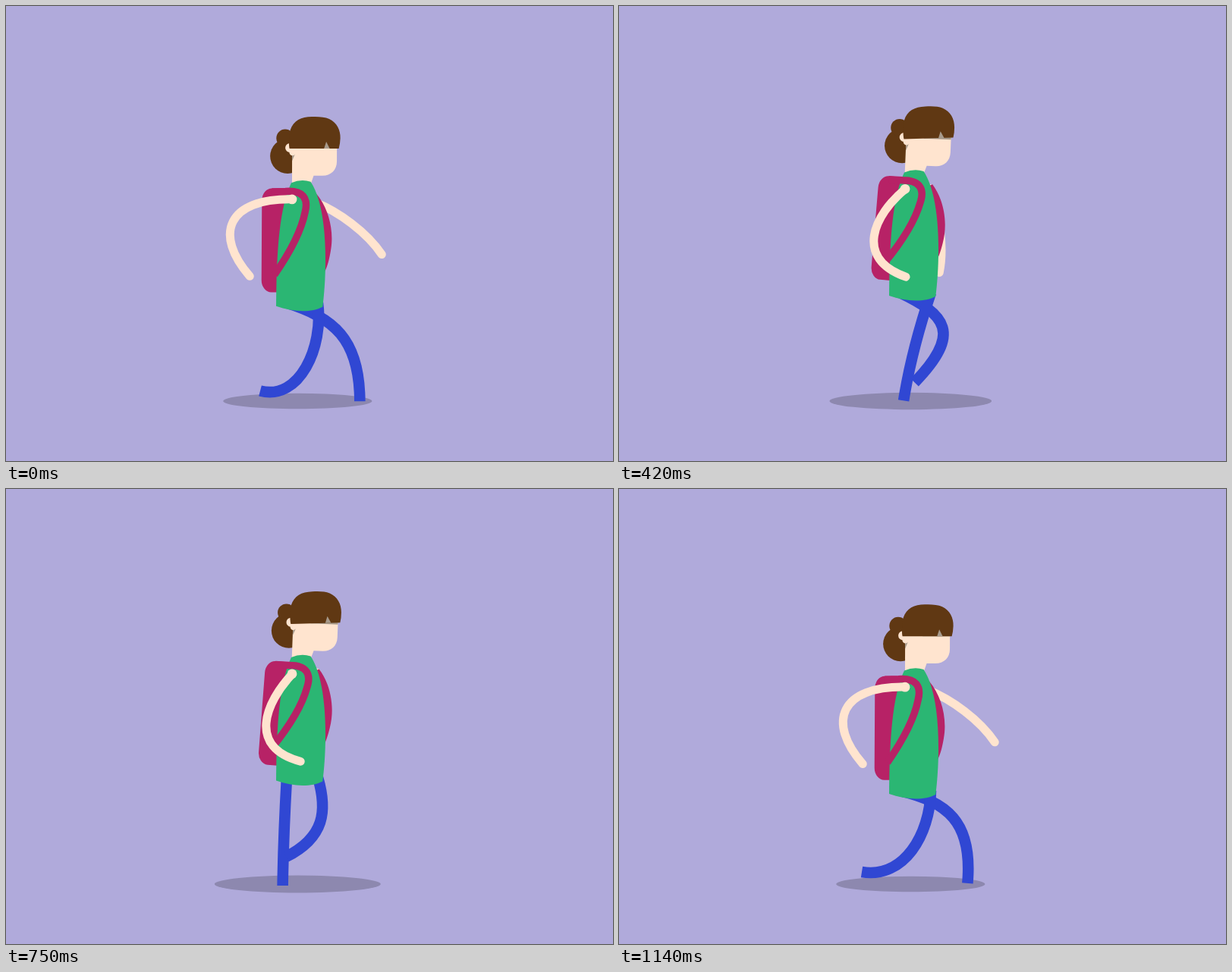
Recreate the animation shown at these times as an HTML page. Size 800x600 px, loop 1.17 s.

```html
<!DOCTYPE html>
<html lang="en">
<head>
<meta charset="utf-8">
<title>Walking with a backpack</title>
<style>
  html, body { margin: 0; height: 100%; overflow: hidden; background: #b0aadb; }
  svg { display: block; width: 100vw; height: 100vh; }
  .limb { fill: none; }
  .leg { stroke: #3047d3; stroke-width: 14.6; }
  .arm { stroke: #ffe4cf; stroke-width: 11; stroke-linecap: round; }
  .skin { fill: #ffe4cf; }
  .hair { fill: #603813; }
  .shade { fill: #a79a8b; }
  .bag { fill: #b72266; }
  .strap { fill: none; stroke: #b72266; stroke-width: 9.5; }
  .shirt { fill: #2bb673; }
</style>
</head>
<body>
<svg viewBox="0 0 800 600">
  <ellipse id="shadow" cx="384.3" cy="521" fill="#000" fill-opacity=".2"/>
  <path id="legL" class="limb leg"/>
  <path id="legR" class="limb leg"/>
  <g id="body">
    <path id="farArm" class="limb arm"/>
    <g id="bag" class="bag">
      <path d="M408 246C424 264 433 294 428 322C426 334 424 342 420 350L400 350V250Z"/>
      <rect x="337" y="240" width="42" height="137" rx="13" ry="16"/>
    </g>
    <g id="bun">
      <circle class="hair" cx="371" cy="197.3" r="23"/>
      <circle class="hair" cx="367.8" cy="173.5" r="11.6"/>
    </g>
    <g id="face">
      <path class="skin" d="M377 180H436V204C436 216 428 223 417 223H405.5L401 236H377Z"/>
      <path class="shade" d="M400 183H436V187.2H400ZM377 195L381 194L377 204Z"/>
      <circle class="skin" cx="374" cy="186.5" r="6"/>
      <circle class="skin" cx="377.5" cy="192.5" r="4.2"/>
    </g>
    <g id="hair">
      <path class="hair" d="M373.500 187.300C372.500 183 372.500 172 374.500 163C379 150 389 145.300 403 145.300C412 145 420 145.600 426 148.300C436 153 441 163 440.500 174Q440.300 181 438.500 187.500Z"/>
      <path class="shade" d="M422 178.500L426.500 187.500H419Z"/>
    </g>
    <path class="shirt" d="M376 232.500Q389 227 401.500 231C414 250 421 285 421 335C421 357 419.500 378 417.300 396C402 404 378 403 356 395C356.500 340 358 270 376 232.500Z"/>
    <path id="strap" class="strap" d="M350 244.500L368 244C391 242 398.500 253 394 271C389 297 374 325 354 354"/>
    <circle class="skin" cx="377" cy="254.300" r="6.400"/>
    <path id="nearArm" class="limb arm"/>
  </g>
</svg>
<script>
const STEP = 30, STEPS = 39, CYCLE = STEPS / 2;
const { PI, abs, sin, cos, floor, min, max } = Math;
const el = id => document.getElementById(id);

// Key poses of a stride: phase, knee handle, foot
const legL = [
  [0, 468, 437, 467.8, 521],
  [6.2, 365, 475, 362, 523],
  [10.5, 394, 473, 320, 505.5],
  [13, 450, 428, 379, 493],
  [17.5, 457, 439, 407.5, 511.5]
];
const legR = [
  [0.5, 387, 521, 335, 507.5],
  [6.2, 421, 458, 371, 485],
  [10.5, 439, 440, 446.5, 520],
  [13, 386, 465, 386, 519.5],
  [17.5, 379, 482, 357, 522.5],
  [19, 376, 514, 320, 505]
];

// Monotone cubic through the poses, repeating every cycle
function pose(keys, p) {
  const n = keys.length;
  const at = (i, j) => keys[(i + n) % n][j] + (j ? 0 : CYCLE * floor(i / n));
  const i = keys.filter(k => k[0] <= p).length - 1;
  const slope = (a, j) => (at(a + 1, j) - at(a, j)) / (at(a + 1, 0) - at(a, 0));
  const tangent = (a, j) => {
    const s = slope(a - 1, j), e = slope(a, j);
    return s * e > 0 ? 2 * s * e / (s + e) : 0;
  };
  const h = at(i + 1, 0) - at(i, 0), t = (p - at(i, 0)) / h;
  return [1, 2, 3, 4].map(j => at(i, j) + (at(i + 1, j) - at(i, j)) * t * t * (3 - 2 * t)
    + h * t * (1 - t) * ((1 - t) * tangent(i, j) - t * tangent(i + 1, j)));
}

const curve = (id, x, y, ...rest) =>
  el(id).setAttribute('d', `M${x} ${y}C${rest.join(' ')}`);
const place = (id, value) => el(id).setAttribute('transform', value);

// The thigh leans out in proportion to the knee
function leg(id, keys, p, x, y) {
  const [kx, ky, fx, fy] = pose(keys, p);
  const dx = fx - x, dy = fy - y;
  const along = ((kx - x) * dx + (ky - y) * dy) / (dx * dx + dy * dy);
  const lean = (k, d) => 0.32 * d + 0.75 * (k - along * d);
  curve(id, x, y, x + lean(kx - x, dx), y + lean(ky - y, dy), kx, ky, fx, fy);
}

// Joints are [radius, degrees] around the shoulder
function arm(id, x, y, ...joints) {
  const points = joints.flatMap(([r, deg]) =>
    [x + r * cos(deg * PI / 180), y + r * sin(deg * PI / 180)]);
  curve(id, x, y, ...points);
}

function draw(ms) {
  const p = (floor(ms / STEP) % STEPS + 0.5) % CYCLE;
  const turn = 2 * PI / CYCLE;
  const y = 6.7 + 1.5 * cos(turn * p) - 20 * abs(sin(turn * (p + 0.7)));
  const tilt = 1.08 * abs(sin(turn * p)) ** 1.5;

  const rx = 106.5 - 8.5 * cos(turn * p);
  el('shadow').setAttribute('rx', rx);
  el('shadow').setAttribute('ry', rx / 9.6);

  leg('legL', legL, p, 370, 391 + y);
  leg('legR', legR, p, 411, 391 + y);

  // 1 with the arms fully apart, 0 when they have crossed
  const u = min(p, CYCLE - p);
  const apart = min(1, max(0, 1 - (u - 0.5) / 8.5)) ** 1.45;
  const near = 75 + 44 * apart, far = 106 - 68 * apart;
  arm('nearArm', 377.5, 254.2,
    [50 + 36 * apart ** 2, near + 45 + 17 * apart], [114, near + 37], [116, near]);
  arm('farArm', 410 - 3 * apart, 251 + 7 * apart,
    [34, far - 16], [79, far - 8], [112, far]);

  place('body', `translate(0 ${y})`);
  for (const id of ['bag', 'strap']) place(id, `rotate(${4.5 * tilt} 384 308)`);
  place('bun', `translate(${1.9 * tilt} 0)`);
  place('face', `rotate(${2.2 * tilt} 385 226)`);
  place('hair', `translate(${1.9 * tilt} ${1.2 * tilt}) rotate(${-1.8 * tilt} 374 187)`);
}

function tick() {
  draw(performance.now());
  requestAnimationFrame(tick);
}
tick();
</script>
</body>
</html>
```
